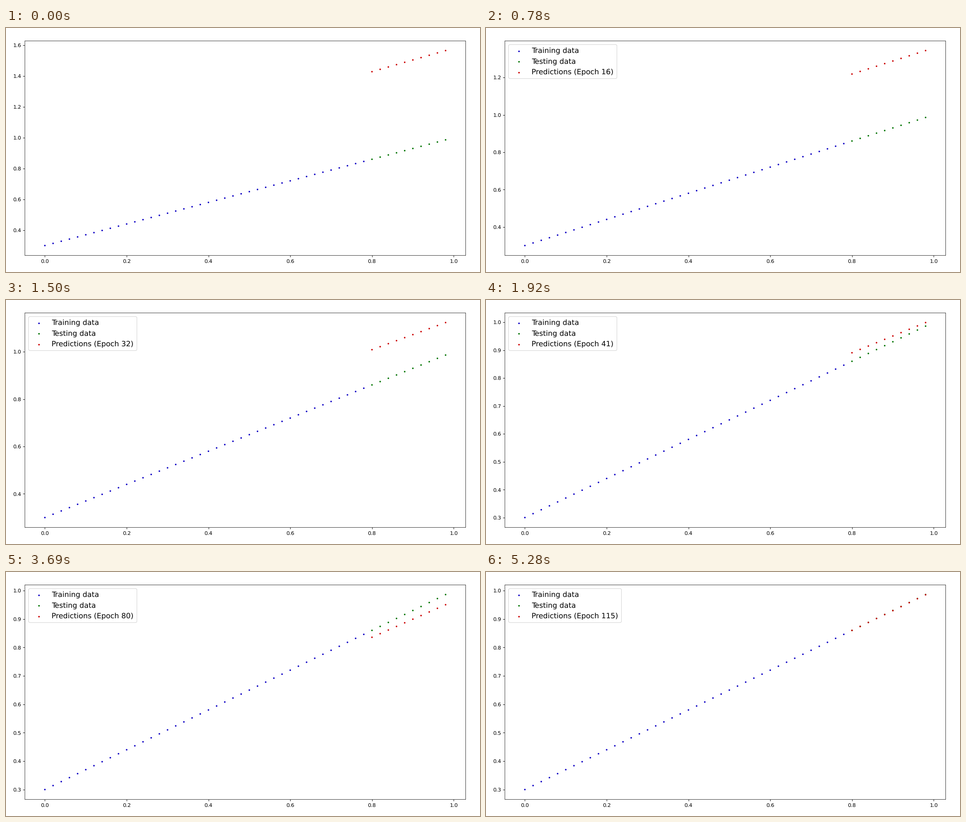
Write a matplotlib script that moves like this. It is 1041 px wide and 538 px high and loops after 5.52 s.

```python
import numpy as np
import matplotlib.pyplot as plt
from matplotlib.animation import FuncAnimation

W, H, DPI = 1041, 538, 82
FRAMES, INTERVAL = 184, 30
BLUE, GREEN, RED = "#0d00c4", "#007400", "#cc0000"

plt.rcParams.update({
    "font.family": "DejaVu Sans",
    "text.hinting": "none",
    "axes.edgecolor": "#2b2b2b",
})

x = np.arange(50, dtype=np.float32) * np.float32(0.02)
y = np.float32(0.7) * x + np.float32(0.3)
x_train, y_train = x[:40], y[:40]
x_test, y_test = x[40:], y[40:]


def train(epochs, w=0.76453852, b=0.83000792, rate=0.01):
    """Gradient descent on the mean absolute error; one (w, b) per epoch."""
    w, b, rate = np.float32([w, b, rate])
    steps = []
    for _ in range(epochs):
        sign = np.sign(w * x_train + b - y_train)
        w = w - rate * np.mean(sign * x_train)
        b = b - rate * np.mean(sign)
        steps.append((w, b))
    return steps


MODEL = train(116)

# Pace of the training: frame at which an epoch begins
PACE_FRAME = [0, 26, 28, 50, 51, 87, 88, 123, 124, 140, 141, 176]
PACE_EPOCH = [0, 16, 17, 32, 33, 56, 57, 80, 81, 91, 92, 115]

# The small surplus keeps the pixel size from rounding down
fig = plt.figure(figsize=((W + 0.01) / DPI, (H + 0.01) / DPI), dpi=DPI,
                 facecolor="white")
left, right, top, bottom = 41.4, 1009.4, 28.3, 501.2
ax = fig.add_axes([left / W, 1 - bottom / H, (right - left) / W, (bottom - top) / H])
ax.set_xlim(-0.049, 1.029)


def dots(xs, ys, color, label):
    # One size per dot keeps positions finer than whole pixels
    return ax.scatter(xs, ys, s=np.full(len(xs), 4.0), c=color, label=label)


dots(x_train, y_train, BLUE, "Training data")
dots(x_test, y_test, GREEN, "Testing data")
pred = dots(x_test, y_test, RED, "Predictions")
legend = ax.legend(loc="upper left", prop={"size": 14})
caption = legend.get_texts()[2]


def update(frame):
    epoch = int(np.interp(frame, PACE_FRAME, PACE_EPOCH) + 1e-6)
    w, b = MODEL[epoch]
    y_pred = w * x_test + b
    pred.set_offsets(np.column_stack([x_test, y_pred]))
    low, high = y.min(), max(y.max(), y_pred.max())
    pad = 0.05 * (high - low)
    ax.set_ylim(low - pad, high + pad)
    caption.set_text(f"Predictions (Epoch {epoch})")
    legend.set_visible(frame > 0)
    return pred, legend


anim = FuncAnimation(fig, update, frames=FRAMES, interval=INTERVAL,
                     repeat=True, repeat_delay=0, blit=False)
plt.show()
```
